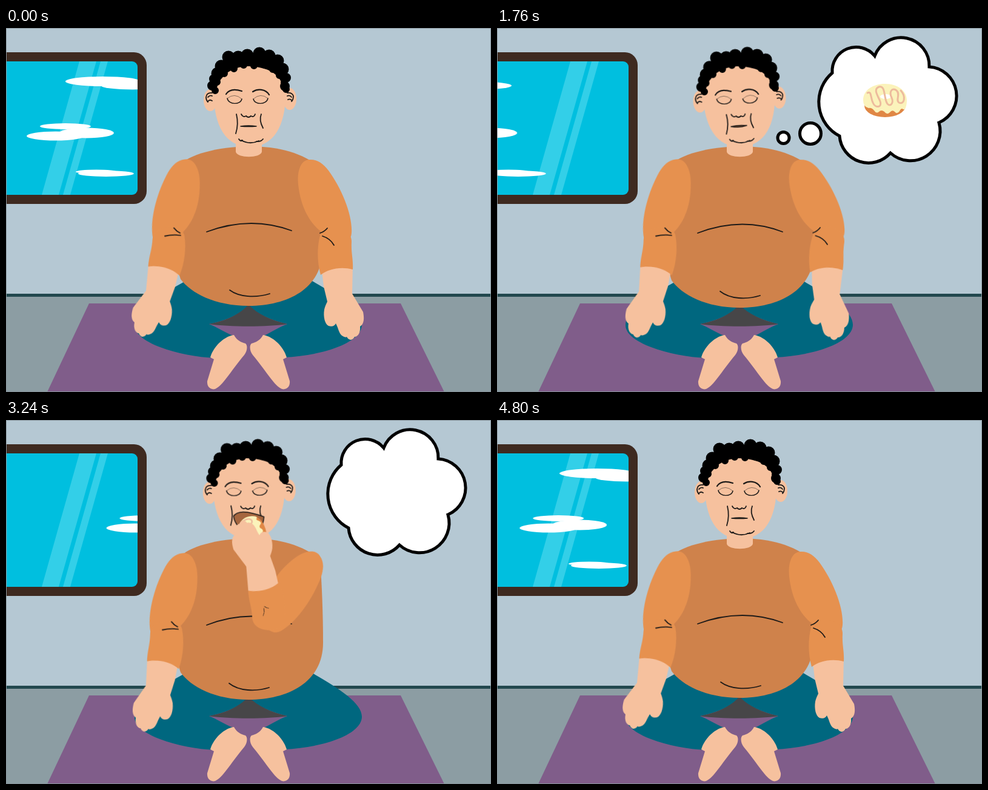
Write an HTML page without scripts that moves like this. It is 800x600 px and loops after 4840 ms.

```html
<!DOCTYPE html>
<html lang="en">
<head>
<meta charset="utf-8">
<title>Meditation break</title>
<style>
  html, body { margin: 0; width: 100%; height: 100%; overflow: hidden; background: #b5c8d3; }
  svg { display: block; width: 800px; height: 600px; }

  .anim { animation: 4.84s ease-in-out infinite; }
  .drift { animation-timing-function: linear; }
  .show { animation-timing-function: step-end; opacity: 0; }
  .skin { fill: #f6c19e; }
  .sleeve { fill: #e6914f; }
  .shirt { fill: #cf824b; }
  .ink { fill: none; stroke: #1d1a18; stroke-width: 1.8; stroke-linecap: round; }
  .thought { fill: #fff; stroke: #000; stroke-width: 5; }

  .high { animation-name: high; }
  .mid { animation-name: mid; }
  .low { animation-name: low; }
  @keyframes high { to { transform: translateX(-652px); } }
  @keyframes mid { to { transform: translateX(-398px); } }
  @keyframes low { to { transform: translateX(-358px); } }

  .puff1 { animation-name: puff1; }
  .puff2 { animation-name: puff2; }
  .puff3 { animation-name: puff3; }
  .wish { animation-name: wish; }
  .held { animation-name: held; }
  @keyframes puff1 { 0% { opacity: 0; } 24.8% { opacity: 1; } 62.8%, 100% { opacity: 0; } }
  @keyframes puff2 { 0% { opacity: 0; } 27.3% { opacity: 1; } 66.1%, 100% { opacity: 0; } }
  @keyframes puff3 { 0% { opacity: 0; } 29.75% { opacity: 1; } 71%, 100% { opacity: 0; } }
  @keyframes wish { 0% { opacity: 0; } 32.2% { opacity: 1; } 57%, 100% { opacity: 0; } }
  @keyframes held { 0% { opacity: 0; } 57% { opacity: 1; } 71.9%, 100% { opacity: 0; } }

  .torso { animation-name: torso; }
  @keyframes torso {
    0%, 99.2%, 100% { d: path("M285 228C300 208 350 196 400 195C450 195 490 206 518 230C521 270 522 320 522 365C522 430 464 458 400 458C345 458 305 437 288 414C276 380 270 290 285 228Z"); }
    14.9%, 41.3%, 66%, 80% { d: path("M285 228C300 208 350 196 400 195C450 195 490 206 518 230C521 270 523 320 523 367C523 433 464 461 400 461C345 461 305 440 288 416C276 380 270 290 285 228Z"); }
    52.1%, 57% { d: path("M250 232C275 205 315 188 385 187C420 187 455 194 485 212C490 260 508 310 509 357C509 428 430 459 355 459C318 459 290 440 276 422C250 380 240 290 250 232Z"); }
  }
  .chest { animation-name: chest; }
  @keyframes chest {
    0%, 99.2%, 100% { d: path("M331 336Q403 309 471 334"); }
    14.9%, 41.3%, 66%, 80% { d: path("M331 338Q403 310 471 336"); }
    52.1%, 57% { d: path("M312 345Q365 309 450 319"); }
  }
  .belly { animation-name: belly; }
  @keyframes belly {
    0%, 99.2%, 100% { d: path("M369 432C385 444 412 445 435 438"); }
    14.9%, 41.3%, 66%, 80% { d: path("M368 434C384 447 412 448 434 441"); }
    52.1%, 57% { d: path("M366 434C380 442 410 444 433 430"); }
  }
  .legs { animation-name: legs; }
  @keyframes legs {
    0%, 41.3%, 66%, 100% { d: path("M300 415C262 436 212 462 212 490C212 520 290 542 345 544C352 525 364 512 374 507C360 501 348 493 335 488C365 482 385 472 400 458C415 472 438 482 464 488C450 493 438 501 426 507C438 512 452 525 458 543C525 540 587 518 587 489C587 465 545 440 500 414Z"); }
    52.1%, 57% { d: path("M290 425C250 440 211 470 211 499C211 525 290 543 345 544C352 525 364 512 374 507C360 501 346 494 333 490C365 483 390 470 407 455C420 470 438 480 457 484C446 491 438 501 426 507C438 512 452 525 458 542C525 536 583 508 583 480C583 455 540 430 488 406Z"); }
  }
  .gap { animation-name: gap; }
  @keyframes gap {
    0%, 41.3%, 66%, 100% { d: path("M400 456C415 472 438 482 464 488C430 493 370 493 335 488C365 482 385 472 400 456Z"); }
    52.1%, 57% { d: path("M407 453C420 470 438 480 457 484C430 493 370 494 333 490C365 483 390 470 407 453Z"); }
  }

  .lean { animation-name: lean; }
  @keyframes lean {
    0%, 41.3%, 65%, 100% { transform: translate(0, 0); }
    52.1% { transform: translate(-44px, -6px); }
    57% { transform: translate(-40px, -5px); }
  }
  .nod { animation-name: nod; transform-origin: 402px 190px; }
  @keyframes nod {
    0%, 99.2%, 100% { transform: rotate(0); }
    14.9% { transform: rotate(2deg); }
    36.4% { transform: rotate(-2deg); }
    52.1% { transform: rotate(-.3deg); }
    66.9% { transform: rotate(-1deg); }
    76% { transform: rotate(-.4deg); }
  }
  .mouth { animation-name: mouth; }
  @keyframes mouth {
    0%, 30%, 86%, 100% { d: path("M387 162Q400 160 413 162Q400 163 387 162Z"); }
    36.4% { d: path("M387 162Q400 160 413 161Q400 165 387 162Z"); }
    52.1%, 57%, 76%, 80% { d: path("M387 162Q400 158 413 162Q400 170 387 162Z"); }
    64%, 70.2% { d: path("M376 158Q386 144 426 160Q424 185 402 185Q378 178 376 158Z"); }
  }
  .cheek { animation-name: cheek; }
  @keyframes cheek {
    0%, 57%, 76%, 100% { transform: translate(0, 0); }
    64%, 70.2% { transform: translate(-8px, -1px); }
  }

  .arm-r { animation-name: arm-r; }
  @keyframes arm-r {
    0%, 85%, 100% { transform: translate(0, 0) rotate(0); }
    14.9% { transform: translate(0, 0) rotate(-1deg); }
    36.4%, 41.3% { transform: translate(0, 0) rotate(-2deg); }
    52.1% { transform: translate(-39px, -12px) rotate(-46deg); }
    57% { transform: translate(-37px, -11px) rotate(-47deg); }
    64.5%, 70.2% { transform: translate(-8px, 0) rotate(57deg); }
    76% { transform: translate(0, 2px) rotate(-39deg); }
  }
  .fore-r { animation-name: fore-r; }
  @keyframes fore-r {
    0% { transform: rotate(0); }
    14.9% { transform: rotate(4.2deg); }
    36.4%, 41.3% { transform: rotate(7.7deg); }
    52.1% { transform: rotate(33deg); }
    57% { transform: rotate(-103deg); }
    64.5%, 76% { transform: rotate(-243deg); }
    85%, 100% { transform: rotate(-360deg); }
  }
  .crease { animation-name: crease; transform-origin: 18px 97px; }
  @keyframes crease {
    0%, 57%, 85%, 100% { transform: scale(1); }
    64.5%, 76% { transform: scale(.5); }
  }
  .arm-l { animation-name: arm-l; }
  @keyframes arm-l {
    0%, 41.3%, 76%, 100% { transform: translate(0, 0) rotate(7deg); }
    52.1%, 57% { transform: translate(39px, 3px) rotate(10.4deg); }
    66.9% { transform: translate(4px, 3px) rotate(7deg); }
  }
  .fore-l { animation-name: fore-l; }
  @keyframes fore-l {
    0%, 99.2%, 100% { transform: rotate(-13.5deg); }
    14.9% { transform: rotate(-12.5deg); }
    36.4%, 41.3%, 76% { transform: rotate(-11.5deg); }
    52.1%, 57% { transform: rotate(2.5deg); }
    66.9% { transform: rotate(-11deg); }
  }
</style>
</head>
<body>
<svg viewBox="0 0 800 600" xmlns="http://www.w3.org/2000/svg">
  <defs>
    <clipPath id="pane"><rect x="-20" y="55" width="237" height="220" rx="9"/></clipPath>
    <g id="cloud-high"><ellipse cx="160" cy="88" rx="62" ry="8"/><ellipse cx="209" cy="95" rx="52" ry="6.5"/></g>
    <g id="cloud-mid"><ellipse cx="98" cy="162" rx="42" ry="5"/><ellipse cx="82" cy="178" rx="48" ry="7.5"/><ellipse cx="133" cy="173" rx="45" ry="8.5"/></g>
    <g id="cloud-low"><ellipse cx="149" cy="237" rx="34" ry="3.5"/><ellipse cx="165" cy="240" rx="46" ry="5"/></g>

    <path id="foot" class="skin" d="M424 506C440 508 458 525 463 543L457 546L468 582C469 592 462 597 455 595C443 590 431 568 407 539C402 533 401 523 405 520C413 518 420 514 424 506Z"/>
    <path id="upper" class="sleeve" d="M-7-26C-22-25-27-5-25 15C-21 52-6 78 12 92C18 117 62 120 63 95C65 66 47 22 25-8C16-20 6-27-7-26Z"/>
    <g id="forearm">
      <path class="skin" d="M-24 45L-20 80L-14 105Q-18 113-19 118C-21 130-18 142-12 145C-6 147-2 145 0 141C4 148 5 157 10 161Q16 165 18 163C22 170 28 169 31 163C37 163 41 155 40 146C47 142 47 132 45 122L27 92L28 45Z"/>
      <path class="sleeve" d="M-26-4C-31 15-31 40-25 61C-12 51 8 47 28 52C29 35 25 25 26 7C28-20-22-24-26-4Z"/>
    </g>
    <g id="donut">
      <ellipse cy="9" rx="34" ry="19" fill="#e08745"/>
      <path fill="#fbf3bb" d="M-36 0C-36-18-18-27 0-27C20-27 36-16 36 0C36 10 33 17 30 15Q27 12 24 18Q20 24 16 19Q12 15 8 20Q3 25-1 19Q-6 15-10 19Q-14 23-18 17Q-22 12-27 13Q-36 11-36 0Z"/>
      <ellipse cx="1" cy="-6" rx="9" ry="4" fill="#fff"/>
      <path fill="none" stroke="#edbb9d" stroke-width="3" stroke-linecap="round" d="M-29-12C-22-16-24-4-20 4C-16 14-4 12-8 2C-12-8-20-18-10-22C0-24-2-10 2 2C6 14 16 6 11-4C6-14 12-22 19-16C26-10 17 0 23 4C32 8 35-6 26-16"/>
    </g>
  </defs>

  <rect width="800" height="600" fill="#b5c8d3"/>
  <rect y="441" width="800" height="159" fill="#8c9da3"/>
  <rect y="438" width="800" height="5" fill="#22484e"/>
  <path d="M137 454H651L723 600H68Z" fill="#805d8a"/>

  <rect x="-30" y="40" width="262" height="250" rx="21" fill="#3e2a20"/>
  <g clip-path="url(#pane)">
    <rect y="55" width="217" height="220" fill="#00bfdf"/>
    <path d="M121 55H149L87 275H59ZM156 55H168L106 275H94Z" fill="#33cfe8"/>
    <g fill="#fff">
      <g class="anim drift high"><use href="#cloud-high"/><use href="#cloud-high" x="652"/></g>
      <g class="anim drift mid"><use href="#cloud-mid"/><use href="#cloud-mid" x="398"/></g>
      <g class="anim drift low"><use href="#cloud-low"/><use href="#cloud-low" x="358"/></g>
    </g>
  </g>

  <circle class="anim show thought puff1" cx="472.5" cy="181" r="9.5"/>
  <circle class="anim show thought puff2" cx="517" cy="174" r="17.5"/>
  <path class="anim show thought puff3" d="M553 74A39.500 39.500 0 0 1 623 46A46.500 46.500 0 0 1 713 64A48 48 0 0 1 729 156A49 49 0 0 1 649 206A48 48 0 0 1 565 178A63 63 0 0 1 553 74Z"/>
  <g class="anim show wish"><use href="#donut" x="640" y="119"/></g>

  <path class="anim legs" fill="#00677f"/>
  <path class="anim gap" fill="#474648"/>
  <use href="#foot"/>
  <use href="#foot" transform="matrix(-1 0 0 1 800 0)"/>

  <path class="anim torso shirt"/>
  <path class="anim chest ink"/>
  <path class="anim belly ink"/>

  <g class="anim lean">
    <path class="skin" d="M379 180H422V204C420 215 381 215 379 204Z"/>
    <g class="anim nod">
      <ellipse class="skin" cx="337" cy="119" rx="11" ry="18"/>
      <ellipse class="skin" cx="468" cy="117" rx="11" ry="18"/>
      <path class="skin" d="M343 110C343 160 362 196 402 196C442 196 461 160 461 110C458 70 430 58 402 58C370 58 345 80 343 110Z"/>
      <!-- curls are round-capped dots -->
      <g stroke="#000" stroke-linecap="round">
        <path stroke="none" d="M340 105C338 80 360 45 400 42C440 40 465 70 465 105L459 105C455 80 440 65 400 63C370 64 350 80 346 107Z"/>
        <path stroke-width="21" d="M367 48h0M383 48h0M398 45h0M418 42h0M434 46h0M448 54h0M355 63h0M349 75h0M456 68h0"/>
        <path stroke-width="16" d="M343 84h0M340 95h0M462 82h0M460 96h0"/>
        <path stroke-width="12" d="M345 103h0M348 89h0M360 75h0M376 67h0M392 61h0M409 62h0M427 61h0M440 68h0M451 78h0M459 90h0M462 101h0"/>
      </g>
      <g class="ink">
        <path stroke-width="2.2" d="M363 109Q370 98 389 104M407 105C415 100 428 100 434 110"/>
        <path stroke-width="1.4" d="M365 116C367 127 387 127 389 117M408 117C410 127 430 127 432 116"/>
        <path stroke-width=".5" d="M365 116Q377 106 389 117M408 117Q420 106 432 116"/>
        <path d="M388 142Q391 148 396 145Q400 149 404 145Q409 148 411 142M421 142Q417 152 424 165"/>
        <path d="M384 183Q387 188 390 185M388 185Q402 193 417 186M413 187Q420 188 424 183"/>
        <path d="M340 107Q331 106 330 114Q330 119 333 122M333 114Q337 110 340 112M333 121Q336 117 340 120M464 107Q472 106 474 112Q474 118 471 121M464 112Q468 110 471 114M465 118Q469 116 472 120"/>
        <path class="anim cheek" d="M380 142Q384 158 379 174"/>
      </g>
      <path class="anim mouth" fill="#a5663f" stroke="#1d1a18" stroke-width="1.6" stroke-linejoin="round"/>
    </g>
  </g>

  <g transform="matrix(-1 0 0 1 800 0) translate(507 243)">
    <g class="anim arm-l">
      <use href="#upper"/>
      <g transform="translate(37 98)"><g class="anim fore-l"><use href="#forearm"/></g></g>
      <path class="ink" d="M26.500 84Q23 90 17.500 93.500M43 95.500Q30 94 17 97.500"/>
    </g>
  </g>

  <g transform="translate(507 243)">
    <g class="anim arm-r">
      <use href="#upper"/>
      <g transform="translate(37 103)">
        <g class="anim fore-r">
          <g class="anim show held"><use href="#donut" transform="translate(12 143) rotate(85) scale(.85)"/></g>
          <use href="#forearm"/>
        </g>
      </g>
      <path class="anim crease ink" d="M11 95Q18 93 23 87M15 100Q28 104 34 115"/>
    </g>
  </g>

  <rect x=".5" y=".5" width="799" height="599" fill="none" stroke="#87939b"/>
</svg>
</body>
</html>
```
